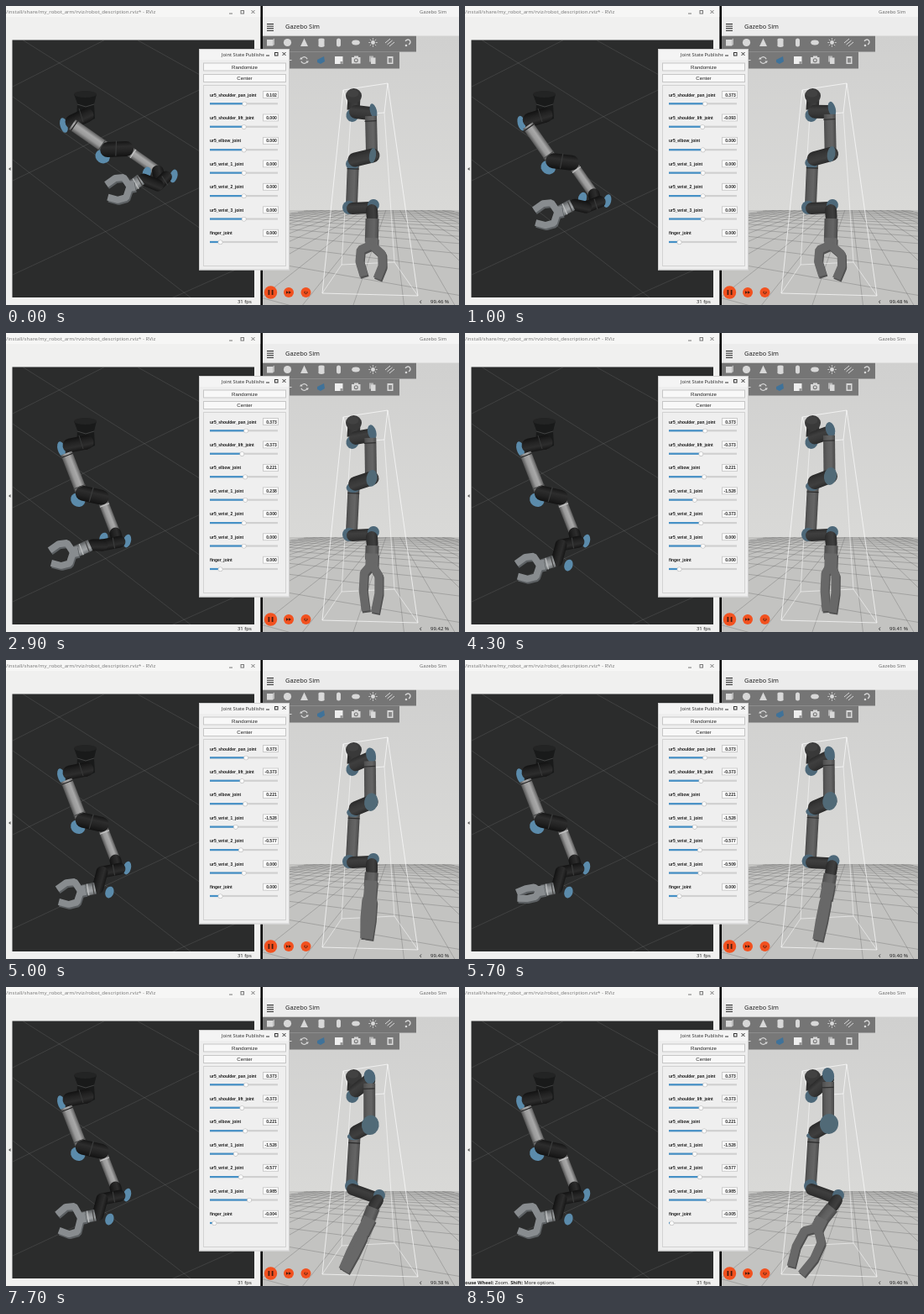
An HTML page with a canvas that plays this animation: 540 px wide and 356 px high, repeating every 8.6 s.

```html
<!DOCTYPE html>
<html lang="en">
<head>
<meta charset="utf-8">
<title>Joint control</title>
<style>
html, body { margin: 0; width: 100%; height: 100%; overflow: hidden; background: #f0f0f0; }
canvas { display: block; width: 540px; height: 356px; }
</style>
</head>
<body>
<canvas id="stage" width="540" height="356"></canvas>
<script>
const ctx = document.getElementById('stage').getContext('2d');
const LOOP = 8600, STEP = 100;
const UI = '"Noto Sans", "Open Sans", sans-serif';
const ARIAL = '"Liberation Sans", Arial, sans-serif';

// Each slider is dragged in turn: [time, value] key points.
const joints = [
  ['ur5_shoulder_pan_joint', [0, .102], [600, .373]],
  ['ur5_shoulder_lift_joint', [800, 0], [1600, -.373]],
  ['ur5_elbow_joint', [1800, 0], [2000, .153], [2200, .221]],
  ['ur5_wrist_1_joint', [2500, 0], [2900, .238], [3600, -1.528]],
  ['ur5_wrist_2_joint', [3900, 0], [4300, -.373], [4700, -.577]],
  ['ur5_wrist_3_joint', [5200, 0], [5700, -.509], [6700, .985]],
  ['finger_joint', [7200, 0], [7700, -.004], [7900, -.005]]
];
const speed = [[0, 99.46], [2000, 99.51], [2900, 99.42], [7700, 99.38], [8500, 99.4]];

const ramp = (t, from, to) => Math.min(1, Math.max(0, (t - from) / (to - from)));
const mix = (a, b, k) => a + (b - a) * k;
const add = ([x, y], dx, dy) => [x + dx, y + dy];
const polar = ([x, y], len, angle) => [x + len * Math.cos(angle), y + len * Math.sin(angle)];

function at(keys, t) {
  let v = keys[0][1];
  for (let i = 1; i < keys.length; i++) v = mix(v, keys[i][1], ramp(t, keys[i - 1][0], keys[i][0]));
  return v;
}

function rect(x, y, w, h, fill, stroke) {
  ctx.fillStyle = fill;
  ctx.fillRect(x, y, w, h);
  if (stroke) {
    ctx.strokeStyle = stroke;
    ctx.lineWidth = 1;
    ctx.strokeRect(x + .5, y + .5, w - 1, h - 1);
  }
}

function line(color, width, ...p) {
  ctx.strokeStyle = color;
  ctx.lineWidth = width;
  ctx.beginPath();
  for (let i = 0; i < p.length; i += 2) ctx.lineTo(p[i], p[i + 1]);
  ctx.stroke();
}

function poly(fill, ...p) {
  ctx.fillStyle = fill;
  ctx.beginPath();
  for (let i = 0; i < p.length; i += 2) ctx.lineTo(p[i], p[i + 1]);
  ctx.fill();
}

function oval([x, y], rx, ry, fill, turn = 0) {
  ctx.fillStyle = fill;
  ctx.beginPath();
  ctx.ellipse(x, y, rx, ry, turn, 0, 7);
  ctx.fill();
}

function arc(x, y, r, from, to, color, width) {
  ctx.strokeStyle = color;
  ctx.lineWidth = width;
  ctx.beginPath();
  ctx.arc(x, y, r, from, to);
  ctx.stroke();
}

function text(s, x, y, font, color = '#222', align = 'left') {
  ctx.font = font;
  ctx.fillStyle = color;
  ctx.textAlign = align;
  ctx.fillText(s, x, y);
}

function clip(x, y, w, h, draw) {
  ctx.save();
  ctx.beginPath();
  ctx.rect(x, y, w, h);
  ctx.clip();
  draw();
  ctx.restore();
}

// A cylinder between two points, shaded across its width.
function tube(a, b, w, tones, cap = 'butt') {
  const angle = Math.atan2(b[1] - a[1], b[0] - a[0]) - Math.PI / 2;
  const g = ctx.createLinearGradient(...polar(a, w / 2, angle), ...polar(a, -w / 2, angle));
  tones.forEach((c, i) => g.addColorStop(i / (tones.length - 1), c));
  ctx.lineCap = cap;
  line(g, w, ...a, ...b);
  ctx.lineCap = 'butt';
}

// A thin band around a tube, at share k of its length.
function ring(a, b, k, w, color) {
  const angle = Math.atan2(b[1] - a[1], b[0] - a[0]) + Math.PI / 2;
  const c = [mix(a[0], b[0], k), mix(a[1], b[1], k)];
  line(color, 1.2, ...polar(c, w / 2, angle), ...polar(c, -w / 2, angle));
}

// Two-fingered gripper: palm point, reach along an angle, half spread across it.
function hand(palm, reach, angle, spread, side, w, face, edge) {
  const spot = (u, v) => polar(polar(palm, u * reach, angle), v * spread, side);
  ctx.lineJoin = 'bevel';
  for (const [color, shift] of [[edge, 2], [face, 0]]) {
    ctx.save();
    ctx.translate(shift * .6, shift);
    line(color, w * 1.5, ...spot(-.12, 0), ...spot(.2, 0));
    for (const s of [-1, 1]) {
      line(color, w, ...spot(.08, 0), ...spot(.28, s * .8), ...spot(.62, s * .85), ...spot(1, s * .5));
    }
    ctx.restore();
  }
  ctx.lineJoin = 'miter';
}

function windowButtons(xs, y, color) {
  const [a, b, c] = xs;
  line(color, 1, a - 2, y + 2, a + 2, y + 2);
  ctx.strokeRect(b - 1.5, y - 1.5, 3.5, 3.5);
  line(color, 1, c - 2, y - 2, c + 2, y + 2);
  line(color, 1, c + 2, y - 2, c - 2, y + 2);
}

const STEEL = ['#5f5f5f', '#a9a9a9', '#9a9a9a', '#545454'];
const BLACK = ['#161616', '#2d2d2d', '#222', '#121212'];
const PALE = ['#6c7072', '#a0a3a5', '#8b8e90', '#585b5d'];
const GREY = ['#4a4a4a', '#656565', '#5e5e5e', '#4d4d4d'];
const DARK = ['#2b2b2b', '#3f3f3f', '#383838', '#2a2a2a'];

function leftArm(t) {
  const [pan, lift, , bend, roll, spin] = joints.map(([, ...keys]) => at(keys, t));
  const swing = .45 * (pan - .102) / .271 + .55 * lift / -.373;
  const fold = Math.max(0, bend / -1.528), twist = roll / -.577;
  const angle = mix(.61, 1.2, swing), blue = '#5b8bab';

  const cap = [mix(70, 67, swing), mix(141, 137, swing)];
  const upper = add(cap, mix(9, 5, swing), mix(0, 6, swing));
  const elbow = polar(upper, 49, angle);
  const front = add(elbow, 24, mix(1, 7, swing));
  const wrist = polar(front, 46, angle);
  const cuff = add(wrist, mix(17, 12, swing), mix(6, 9, swing));
  const mid = add(wrist, mix(0, -16, swing), mix(17, 14, swing));
  const end = add(wrist, mix(-17, -27, swing) + 6 * fold, mix(10, 14, swing) + 19 * fold);
  const palm = add(end, mix(-14, -21, swing) + 3 * fold, 8 - 5 * twist);

  poly('#191a1a', 81, 105, 108, 105, 105, 117, 106, 134, 96, 139, 84, 134, 85, 116);
  oval([94.5, 105], 13.5, 4, '#232424');
  oval(add(cap, -1, 1), 4.5, 9, blue, -.25);
  tube([96, 130], add(cap, 9, -3), 17, BLACK, 'round');
  line('#414242', 1, 85, 117, 95, 120, 105, 117);
  line('#383939', 1, 87, 122, 92, 138);

  tube(upper, elbow, 14, STEEL);
  ring(upper, elbow, .06, 14, '#222');
  tube(front, wrist, 12, STEEL);
  oval(add(elbow, -4, 10), 9, 8, blue, .6);
  tube(add(elbow, 2, 2), front, 18, BLACK, 'round');
  ring(upper, elbow, .88, 15, '#484949');
  ring(elbow, front, .5, 18, '#3b3c3c');
  ring(front, wrist, .22, 12, '#c4c4c4');

  oval(add(cuff, 2, 0), 4.5, 8, blue, .25);
  oval(add(end, mix(4, 14, Math.max(swing * .9, fold)), mix(-8, 5, fold)), 5, 7, blue, .3);
  tube(wrist, add(wrist, 2, 8), 14, BLACK, 'round');
  tube(add(cuff, -7, 1), mid, 14, BLACK, 'round');
  tube(mid, end, 14, BLACK, 'round');
  ring(cuff, mid, .5, 13, '#3b3c3c');
  tube(add(end, -3, 0), palm, 14, PALE);
  ring(end, palm, .3, 14, '#444');
  ring(end, palm, .65, 14, '#c0c2c3');
  hand(palm, 30, 2.95, 20 * Math.cos(spin - .7), 1.45, 8, '#888c8f', '#5c6063');
}

function leftWindow(t) {
  rect(0, 0, 303.5, 356, '#f0f0ef');
  rect(0, 0, 303.5, 13, '#f6f6f5');
  text('/install/share/my_robot_arm/rviz/robot_description.rviz* - RViz', 0, 8.7, '6.1px ' + UI, '#7c7c7c');
  windowButtons([268, 281.5, 294.5], 7, '#777');
  for (const x of [3, 301.5]) poly('#555', x, 194, x + 2.5, 192, x + 2.5, 196);
  clip(7.5, 40.5, 288.5, 306.5, () => {
    rect(7, 40, 290, 308, '#2b2c2c');
    for (let i = 0; i < 4; i++) {
      line('rgba(150,150,150,.28)', .7, 8, 96 + i * 112, 296, -50 + i * 118);
      line('rgba(150,150,150,.28)', .7, 8, -42 + i * 75, 296, 118 + i * 96);
    }
    leftArm(t);
  });
  text('31 fps', 276, 354, '5.9px ' + UI);
  if (t >= 8200) {
    let x = 0;
    for (const [i, s] of ['ouse Wheel:', ' Zoom. ', 'Shift:', ' More options.'].entries()) {
      text(s, x, 354, (i % 2 ? '' : 'bold ') + '5.7px ' + UI);
      x += ctx.measureText(s).width;
    }
  }
}

// Floor grid in perspective, turned a little against the view.
function floorGrid() {
  const cell = .45, yaw = .22;
  const spot = (u, v) => {
    const d = Math.max(.3, 3.6 + v * Math.cos(yaw) - u * Math.sin(yaw));
    return [430 + 130 * (u * Math.cos(yaw) + v * Math.sin(yaw)) / d, 225 + 130 / d];
  };
  for (let i = -10; i <= 10; i++) {
    const w = i * cell, end = 10 * cell;
    for (let k = -10; k < 10; k++) {
      const a = k * cell, b = a + cell;
      const c = 'rgba(85,85,85,.5)';
      line(c, .6, ...spot(w, Math.max(a, -3)), ...spot(w, Math.max(b, -3)));
      if (w > -3) line(c, .6, ...spot(a, w), ...spot(Math.min(b, end), w));
    }
  }
}

function rightArm(t) {
  const drift = t / 8500, blue = '#4d6879';
  const late = ramp(t, 5200, 7700), drop = ramp(t, 2000, 2900);
  const spin = .3 * ramp(t, 0, 2000) + .85 * drop + .25 * ramp(t, 2900, 4300)
    + .35 * ramp(t, 4300, 5700) - .1 * late + 1.35 * ramp(t, 7700, 8400) - .3;

  const shoulder = [434 - 2 * drift, 128 - 18 * drift];
  const elbow = [437 - 3 * drift, 178 - 15 * drift];
  const fore = [414 + 2 * drift, 184 - 11 * drift];
  const wrist = [412, 239];
  const cuff = [437 + 7 * late, 239 + 11 * late];
  const angle = 1.6 + .1 * ramp(t, 4300, 5700) + .33 * late;
  const palm = add(polar(cuff, mix(42, 31, drop), angle), -8 * ramp(t, 7700, 8500), 4 * late);

  tube([415, 109], [414, 124], 15, DARK);
  oval([414.5, 107], 9.5, 9, '#393939');
  oval([413.5, 104], 7, 4.5, '#424242');
  oval([413, 130], 7.5, 8, blue, .2);
  tube([417, 126 - 3 * drift], shoulder, 16, DARK, 'round');
  oval(add(shoulder, 4 - 3 * drift, -3 - 2 * drift), 4 + 3 * drift, 9, blue, -.25);
  tube(add(shoulder, 1, 3), add(elbow, -1, -4), 14, GREY);
  ring(shoulder, elbow, .18, 14, '#303030');

  tube(fore, add(wrist, 0, -3), 14, GREY);
  oval(add(fore, -1, 4), 8, 7 - 3 * drift, blue);
  tube(elbow, add(fore, 2, -1), 17, DARK, 'round');
  oval(elbow, 4 + 7 * drift, 9 + 3 * drift, '#516a77', .15);
  ring(fore, wrist, .18, 14, '#2a2a2a');

  oval(add(wrist, -3 + 3 * late, 1 - 3 * late), 8, 8, blue);
  tube(add(wrist, 1, 2), add(cuff, -3, 1), 14, DARK, 'round');
  oval(add(cuff, 1, -2), 7, 7, blue, .3);
  tube(add(cuff, -1, 4), polar(cuff, 12, angle), 14, DARK, 'round');
  tube(polar(cuff, 14, angle), palm, 16, GREY);
  hand(palm, mix(42, 62, drop), angle, 17 * Math.cos(spin), angle - 1.4, 10, '#686868', '#505050');
}

function rightScene(t) {
  const sky = ctx.createLinearGradient(0, 36, 0, 246);
  sky.addColorStop(0, '#d0d0cf');
  sky.addColorStop(1, '#d9d9d7');
  rect(305, 35, 235, 321, sky);
  rect(305, 243, 235, 113, '#c3c3c1');
  clip(305, 243, 235, 113, floorGrid);
  const wire = 'rgba(255,255,255,.75)';
  line(wire, .9, 402, 100, 455, 92, 491, 345, 377, 342, 402, 100, 411, 130, 451, 127, 455, 92);
  line(wire, .7, 377, 342, 400, 308, 411, 130);
  line(wire, .7, 451, 127, 463, 305, 491, 345);
  line(wire, .7, 400, 308, 463, 305);
  rightArm(t);
}

function toolbar() {
  rect(305, 35.5, 184, 19, '#757575');
  rect(305, 54.5, 164, 20, '#787878');
  const c = '#d8d8d8';
  rect(311, 40, 7, 7.5, c);
  poly('#bbb', 318, 40, 320, 38.5, 320, 46, 318, 47.5);
  oval([335.5, 43.5], 4.6, 4.6, c);
  poly(c, 355.5, 38.5, 360, 48, 351, 48);
  rect(372.5, 40, 7, 7.5, c);
  for (const y of [40, 47.5]) oval([376, y], 3.5, 1.4, c);
  ctx.lineCap = 'round';
  line(c, 5, 396.5, 41, 396.5, 46);
  ctx.lineCap = 'butt';
  oval([417, 43.5], 4.8, 2.9, c);
  oval([437.5, 43.5], 2.4, 2.4, c);
  for (let a = 0; a < 6; a += Math.PI / 4) {
    line(c, .9, ...polar([437.5, 43.5], 3.4, a), ...polar([437.5, 43.5], 5.2, a));
  }
  for (let i = 0; i < 3; i++) line(c, 1, 458 + i * 2.5, 39 + i * 2, 452 + i * 2.5, 44 + i * 2);
  arc(479, 43, 3, 3.5, 7.5, c, 1.4);
  oval([477, 47], 1.3, 1.3, c);

  line(c, 1.2, 336, 60, 336, 69);
  line(c, 1.2, 331.5, 64.5, 340.5, 64.5);
  for (const a of [0, Math.PI]) arc(355.5, 64.5, 3.8, a + .4, a + 2.8, c, 1.2);
  poly(c, 350, 63.5, 353.5, 63.5, 351.7, 61);
  poly(c, 357.5, 65.5, 361, 65.5, 359.3, 68);
  poly('#3f7299', 371, 64, 379, 60, 380, 66, 375, 69, 371, 67);
  rect(392, 60, 9.5, 9, '#eee');
  rect(398.5, 66, 3, 3, '#999');
  rect(412, 61, 10.5, 7.5, c);
  rect(415, 59.5, 5, 2, c);
  oval([417.3, 64.7], 2.5, 2.5, '#777');
  oval([417.3, 64.7], 1.4, 1.4, c);
  rect(433, 59.5, 5, 7, '#b5b5b5');
  rect(435, 61.5, 5.5, 7.5, c);
  rect(454.5, 60, 7, 9, c);
  rect(456, 62, 4, 5.5, '#8a8a8a');
}

function rightWindow(t) {
  rect(303.5, 0, 2.5, 356, '#050505');
  rect(306, 0, 234, 14, '#f4f4f4');
  text('Gazebo Sim', 493, 8.6, '5.8px ' + UI, '#6c6c6c');
  rect(306, 13, 234, 23, '#ececec');
  for (let y = 21; y < 29; y += 2.6) line('#222', 1, 311, y + .5, 319, y + .5);
  text('Gazebo Sim', 333, 26.6, '7.4px ' + UI, '#202020');
  clip(306, 35.5, 234, 320.5, () => {
    rightScene(t);
    toolbar();
  });

  const orange = '#f2511f', ink = '#4a1d10';
  oval([315.5, 341], 7.7, 7.7, orange);
  for (const x of [312.5, 316.7]) rect(x, 338, 1.8, 6, ink);
  for (const x of [337, 357.5]) oval([x, 341], 6, 6, orange);
  for (const x of [334, 337]) poly(ink, x, 339.3, x + 3, 341, x, 342.7);
  arc(357.5, 341, 1.6, -.8, 4.2, ink, .9);
  line('#333', .9, 495, 350.5, 493.5, 352.3, 495, 354);
  text(at(speed, t).toFixed(2) + ' %', 506, 354, '6px ' + UI);
}

function slider(name, keys, i, t) {
  const y = 105.5 + i * 27.45, value = at(keys, t);
  const x = name === 'finger_joint' ? 255.5 + value * 1800 : 283.7 + value * 81 / (4 * Math.PI);
  text(name, 243, y + 2, 'bold 4.9px ' + ARIAL, '#1b1b1b');
  rect(306, y - 4.5, 19, 9, '#fcfcfc', '#cacaca');
  text(value.toFixed(3), 322.7, y + 2, 'bold 5px ' + ARIAL, '#222', 'right');
  rect(243, y + 9.7, 81, 2.2, '#d0d0d0');
  rect(243, y + 9.7, x - 243, 2.2, '#4590c6');
  oval([x, y + 11], 2.8, 2.8, '#bdbdbd');
  oval([x, y + 11], 2.3, 2.3, '#fafafa');
}

function dialog(t) {
  rect(230, 51, 108, 263.5, '#eeeeee', '#cfcfcf');
  rect(231, 52, 106, 12, '#f4f4f4');
  clip(250, 52, 57.5, 12, () => text('Joint State Publisher', 257, 59.5, '5.7px ' + UI, '#333'));
  windowButtons([312, 322, 331.5], 57, '#333');
  for (const [s, y] of [['Randomize', 67.5], ['Center', 81]]) {
    rect(235, y, 99, 10, '#f8f8f8', '#c6c6c6');
    text(s, 284.5, y + 7.2, '6.1px ' + ARIAL, '#222', 'center');
  }
  rect(235, 94, 99, 216, '#efefef', '#d2d2d2');
  joints.forEach(([name, ...keys], i) => slider(name, keys, i, t));
}

function frame() {
  const t = Math.floor(performance.now() % LOOP / STEP) * STEP;
  leftWindow(t);
  rightWindow(t);
  dialog(t);
  requestAnimationFrame(frame);
}
frame();
</script>
</body>
</html>
```
